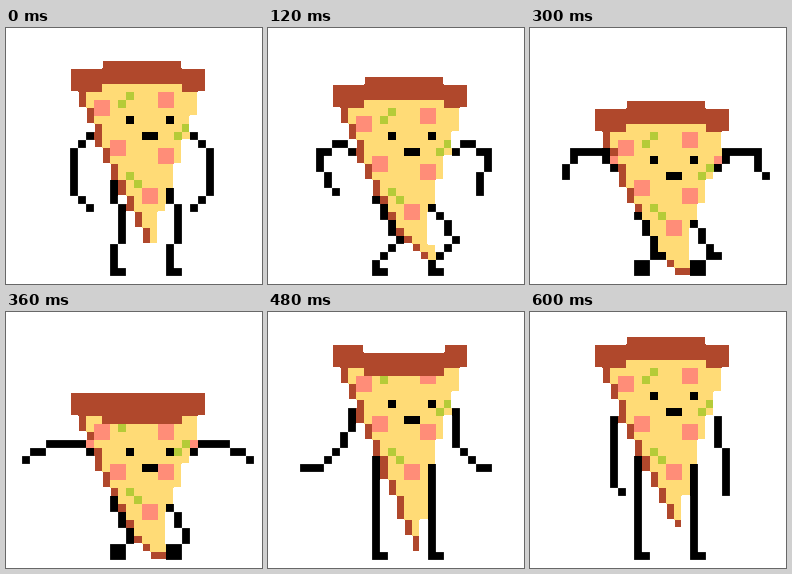
Recreate the animation shown at these times as an HTML page with a canvas. Size 256 px wide and 256 px high, loop 0.66 s.

```html
<!DOCTYPE html>
<html lang="en">
<head>
<meta charset="utf-8">
<title>Bouncing pizza slice</title>
<style>
  html, body { margin: 0; height: 100%; overflow: hidden; background: #fff; }
  canvas { display: block; }
</style>
</head>
<body>
<canvas width="256" height="256"></canvas>
<script>
const ctx = document.querySelector('canvas').getContext('2d');
const CELL = 8, SIZE = 32, STEP = 60, STEPS = 11;
const CRUST = '#b0482c', CHEESE = '#ffdb76', HAM = '#ff8d78', HERB = '#b5cb38', INK = '#000';

// Key values by step, joined by straight lines.
const TOP = { 0: 5, 5: 10, 6: 10, 8: 4, 9: 2, 11: 5 };
const TIP_X = { 0: 17, 2: 19, 4: 18, 10: 18, 11: 17 };
const TIP_Y = { 0: 26, 2: 28, 5: 30, 7: 30, 9: 27, 10: 26, 11: 26 };
const BASE = { 0: 1, 3: 1, 4: 4, 7: 2, 8: 1, 11: 1 };
const BEND = { 0: 1, 2: 3, 4: 3, 6: 2, 7: 0, 10: 0, 11: 1 };
const SWAY = { 0: 0, 4: 0, 6: -1, 8: -2, 10: 1.6, 11: 0 };
// Left arm from shoulder to hand; the right arm mirrors it.
const ARM = {
  0: [10, 13, 8, 15, 8, 20, 10, 22],
  2: [10, 15, 8, 13.6, 5.6, 16.4, 7.5, 20],
  4: [10, 17, 8, 14, 5, 14.6, 5.6, 18],
  6: [10, 17, 9, 16, 5, 16, 2, 18],
  7: [10, 15, 7, 18, 4, 19, 3, 18],
  8: [10, 12, 9, 16, 6, 19, 4, 19],
  10: [10, 13, 10, 17, 10, 21, 11, 22]
};

function track(keys, step) {
  const times = Object.keys(keys).map(Number);
  const a = times.filter(t => t <= step).pop();
  const b = times.find(t => t > step) ?? a;
  const k = b > a ? (step - a) / (b - a) : 0;
  const mix = (p, q) => p + (q - p) * k;
  return Array.isArray(keys[a]) ? keys[a].map((p, i) => mix(p, keys[b][i])) : mix(keys[a], keys[b]);
}
const whole = (keys, step) => Math.round(track(keys, step));

let grid;
function box(color, x, y, w = 1, h = 1) {
  for (let j = y; j < y + h; j++)
    for (let i = x; i < x + w; i++) grid[j * SIZE + i] = color;
}

function limb(pts) {
  for (let p = 0; p + 3 < pts.length; p += 2) {
    const [x1, y1, x2, y2] = pts.slice(p, p + 4);
    const n = Math.ceil(Math.max(Math.abs(x2 - x1), Math.abs(y2 - y1)));
    for (let k = 0; k <= n; k++)
      box(INK, Math.round(x1 + (x2 - x1) * k / n), Math.round(y1 + (y2 - y1) * k / n));
  }
}

function slice(step, top, mid, low) {
  const tipX = whole(TIP_X, step), tipY = whole(TIP_Y, step), base = whole(BASE, step);
  const lean = step > 0 && step < 7;
  const bendY = top + 14;
  box(CHEESE, 12, top + 2, 10);
  for (let y = top + 3; y <= tipY; y++) {
    const k = Math.max(0, y - bendY) / (tipY - bendY + 1);
    const x = y < bendY ? 9 + Math.round((y - top - 3) * 0.4)
      : 14 + Math.floor((tipX - 13) * k ** (lean ? 1.2 : 1));
    let right = y < mid ? 23 : y < mid + 3 ? 22 : y < mid + 6 ? 21 : y < low + 2 ? 20
      : lean ? Math.max(19, x + 2) : y < tipY - 3 ? 19 : Math.max(18, x);
    if (y === tipY - 1) right = Math.max(right, tipX + base - 1);
    box(CHEESE, x, y, right - x + 1);
    box(CRUST, x, y, y === tipY ? base : 1);
  }
}

function legs(step, low) {
  const bend = track(BEND, step);
  [13, 20].forEach((x, i) => {
    const hip = low + 1 + i;
    limb([x, hip, x + bend, low + 6, x, 29, x, 30, x + 1, 30]);
    // Both legs smear as they snap straight.
    if (step === 7) box(INK, x + 1, hip + 2, 1, 29 - hip);
  });
}

function arms(step) {
  const left = track(ARM, step), sway = track(SWAY, step);
  limb(left);
  limb(left.map((v, i) => i % 2 ? v : 33 - v + sway * i / 6));
}

function pizza(step) {
  const top = whole(TOP, step), mid = top + 6, low = Math.min(mid + 7, 22);
  // The middle of the crust lags behind the jump.
  const rise = whole(TOP, (step + STEPS - 1) % STEPS) - top;
  const bow = rise > 2 ? 1 : rise < 0 ? -1 : 0;
  const flat = bow ? 0 : 1, face = mid + (bow < 0 ? 0 : 1);
  slice(step, top, mid, low);

  box(HAM, 11, mid - 2, 2, 2);
  box(HAM, 19, mid - 3 + flat, 2, 2);
  box(HAM, 13, mid + 3, 2, 2);
  box(HAM, 19, mid + 4 - flat, 2, 2);
  box(HAM, 17, low + 2, 2, 2);
  box(HERB, 15, mid - 3);
  box(HERB, 14, mid - 2);
  box(HERB, 22, mid + 1 - flat);
  box(HERB, 21, mid + 2 - flat);
  box(HERB, 15, low);
  box(HERB, 16, low + 1);

  box(CRUST, 8, top, 4, 3);
  box(CRUST, 22, top, 3, 3);
  box(CRUST, 12, top + bow, 10, 3 + flat);

  box(INK, 15, face);
  box(INK, 20, face);
  box(INK, 17, face + 2, 2);
  arms(step);
  legs(step, low);
  if (step > 3 && step < 7) [10, 23].forEach(x => box(HAM, x, 16));
}

// Cells that border on empty ones get a thin pale rim.
function paint() {
  ctx.fillStyle = '#fff';
  ctx.fillRect(0, 0, SIZE * CELL, SIZE * CELL);
  grid.forEach((color, n) => {
    if (!color) return;
    const x = n % SIZE * CELL, y = Math.floor(n / SIZE) * CELL, end = CELL - 1;
    ctx.fillStyle = color;
    ctx.fillRect(x, y, CELL, CELL);
    ctx.fillStyle = color === INK ? 'rgba(255,255,255,.1)' : '#fff';
    if (!grid[n - 1]) ctx.fillRect(x, y, 1, CELL);
    if (!grid[n + 1]) ctx.fillRect(x + end, y, 1, CELL);
    if (!grid[n - SIZE]) ctx.fillRect(x, y, CELL, 1);
    if (!grid[n + SIZE]) ctx.fillRect(x, y + end, CELL, 1);
  });
}

const start = performance.now();
function tick() {
  const step = Math.floor(Math.max(0, performance.now() - start) / STEP) % STEPS;
  grid = Array(SIZE * SIZE).fill('');
  pizza(step);
  paint();
  requestAnimationFrame(tick);
}
tick();
</script>
</body>
</html>
```
